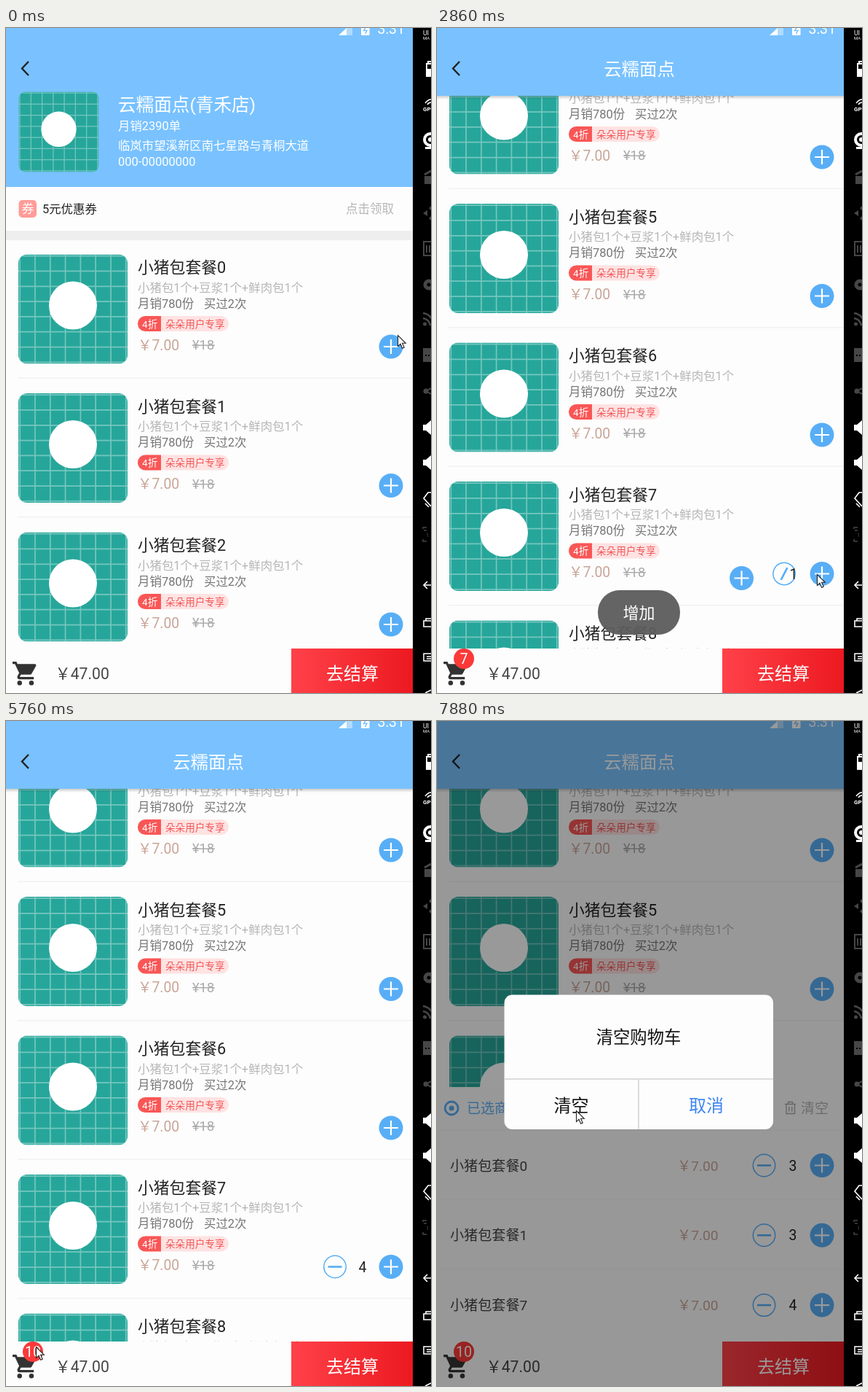
These frames come from a looping animation (584 by 912 pixels, 8000 ms). An HTML page:

```html
<!DOCTYPE html>
<html lang="zh-CN">
<head>
<meta charset="utf-8">
<title>点餐购物车</title>
<style>
  html, body { margin: 0; width: 100%; height: 100%; overflow: hidden; background: #000; }
  svg { display: block; width: 584px; height: 912px; }
  text { font-family: Roboto, "Noto Sans CJK SC", "Noto Sans CJK", sans-serif; white-space: pre; }
</style>
</head>
<body>
<svg id="stage" viewBox="0 0 584 912">
  <defs>
    <linearGradient id="red">
      <stop offset="0" stop-color="#ff4149"/><stop offset="1" stop-color="#ec1920"/>
    </linearGradient>
    <linearGradient id="fade" x2="0" y2="1">
      <stop offset="0" stop-opacity=".2"/><stop offset="1" stop-opacity="0"/>
    </linearGradient>
    <clipPath id="sheetClip"><rect width="559" height="851"/></clipPath>
    <clipPath id="tileClip"><rect width="150" height="150" rx="12"/></clipPath>
    <g id="plus">
      <circle r="16.5" fill="#58aef6"/>
      <path d="M-10 0H10M0-10V10" stroke="#fff" stroke-width="2.2"/>
    </g>
    <g id="minus">
      <circle r="15.2" fill="#fdfdfd" stroke="#58aef6" stroke-width="1.5"/>
      <path d="M-9.5 0H9.5" stroke="#58aef6" stroke-width="2.6"/>
    </g>
    <g id="tile" clip-path="url(#tileClip)">
      <rect width="150" height="150" fill="#26a69a"/>
      <path id="grid" stroke="#fff" stroke-opacity=".36" stroke-width="1.7"/>
      <circle cx="75" cy="70" r="33" fill="#fff"/>
    </g>
  </defs>

  <rect width="559" height="912" fill="#fdfdfd"/>
  <g id="list"></g>
  <g id="head"></g>
  <rect id="scrim" width="559" fill="#79c2ff"/>
  <rect width="559" height="27" fill="#79c2ff"/>
  <g id="bar"></g>
  <rect id="dim" width="559" height="851"/>
  <g clip-path="url(#sheetClip)"><g id="sheet"></g></g>
  <g id="foot"></g>
  <g id="flights"></g>
  <g id="badge">
    <circle cx="37" cy="865" r="14" fill="#fc3939"/>
    <text id="total" x="37" y="872" font-size="19.6" fill="#fff" text-anchor="middle"></text>
  </g>
  <g id="toast"></g>
  <g id="dialog"></g>
  <g id="side"></g>
  <g id="finder">
    <rect x="422" y="416" width="30" height="30" rx="4" fill="#fb474d"/>
    <circle cx="435" cy="429" r="6.5" fill="none" stroke="#fff" stroke-width="1.6"/>
    <path d="M440 434l6 6" stroke="#fff" stroke-width="2.4"/>
  </g>
  <path id="cursor" d="M.5.5V15.6L4 12.3 6.6 18.3 9.2 17.2 6.6 11.3H11.3Z" fill="#fff" stroke="#222" stroke-width="1.1"/>
</svg>

<script>
const LOOP = 8000, FLY = 500, ROLL = 163;
const STEP = 190.5, FIRST = 310.5, COLLAPSE = 198;
const $ = id => document.getElementById(id);
const fill = (id, html) => { $(id).innerHTML = html; };

// Text placed by the middle of its glyphs
const text = (x, mid, size, color, str, anchor = 'start', attrs = '') =>
  `<text x="${x}" y="${mid + size * .37}" font-size="${size}" fill="${color}" text-anchor="${anchor}" ${attrs}>${str}</text>`;
const rect = (x, y, w, h, color, attrs = '') =>
  `<rect x="${x}" y="${y}" width="${w}" height="${h}" fill="${color}" ${attrs}/>`;
const path = (d, color, width = 1.5) =>
  `<path d="${d}" fill="none" stroke="${color}" stroke-width="${width}"/>`;
const use = (id, x, y, attrs = '') => `<use href="#${id}" transform="translate(${x} ${y})" ${attrs}/>`;

let grid = '';
for (let k = 0; k < 8; k++) {
  const p = (2.1 + k * 20.83).toFixed(1);
  grid += `M${p} 0V150M0 ${p}H150`;
}
$('grid').setAttribute('d', grid);

const item = i => `<g id="item${i}">
  ${use('tile', 17, 0)}
  ${text(181, 17.5, 21.8, '#222', '小猪包套餐' + i)}
  ${text(181, 45, 16.45, '#b6b6b6', '小猪包1个+豆浆1个+鲜肉包1个')}
  ${text(181, 67.3, 16.5, '#757575', '月销780份')}
  ${text(272, 67.3, 16.4, '#757575', '买过2次')}
  ${rect(181, 84.5, 125, 21, '#ffe2e2', 'rx="10.5"')}
  <path d="M213 84.5H191.500a10.500 10.500 0 0 0 0 21H213Z" fill="#f95656"/>
  ${text(187, 95.2, 13.6, '#fff', '4折')}
  ${text(219, 95.2, 13.6, '#f25555', '朵朵用户专享')}
  ${text(181, 124, 19.4, '#c9a497', '￥7.00')}
  ${text(256, 124, 18.3, '#aaa', '¥18')}
  ${rect(256, 124, 31, 1.4, '#aaa')}
  ${rect(16, 169, 543, 1.5, '#f1f1f1')}
  <g id="pick${i}"><use id="minus${i}" href="#minus"/>${text(490, 127, 19.4, '#222', '', 'middle', `id="count${i}"`)}</g>
  ${use('plus', 529, 126.5)}
</g>`;
const ids = [...Array(9).keys()];
fill('list', ids.map(item).join(''));

fill('head',
  rect(0, 0, 559, 218, '#79c2ff') +
  use('tile', 17.5, 87.5).replace('")', '')
    .replace(')"', ') scale(.733)"') +
  text(154, 105, 24.6, '#fff', '云糯面点(青禾店)') +
  text(154, 134, 16.4, '#fff', '月销2390单') +
  text(154, 160.5, 16.4, '#fff', '临岚市望溪新区南七星路与青桐大道') +
  text(154, 183, 16.5, '#fff', '000-00000000') +
  rect(0, 218, 559, 60, '#fdfdfd') +
  rect(17.5, 236, 24.5, 24, '#ff9b98', 'rx="5"') +
  text(30, 248, 17, '#fff', '券', 'middle') +
  text(50, 248, 16.4, '#222', '5元优惠券') +
  text(467, 248, 16.5, '#b6b6b6', '点击领取') +
  rect(0, 278, 559, 13, '#eee'));

fill('bar',
  path('M31 46L22 55.500 31 65', '#222', 2.4) +
  `<g id="title">${text(278, 55.5, 24.4, '#fff', '云糯面点', 'middle')}${rect(0, 93, 559, 5, 'url(#fade)')}</g>` +
  '<path d="M457 10L468 0V10Z" fill="#fff"/><path d="M468 0H476V10H468Z" fill="#fff" opacity=".4"/>' +
  rect(488, -4, 11.5, 14, '#fff', 'rx="1"') +
  path('M494.500 -1L491.500 3.500H496L493.500 8', '#79c2ff', 1.5) +
  text(510.5, .8, 19.4, '#fff', '3:31'));

const cart = [0, 1, 7];
const row = (i, k) => {
  const y = 107.5 + k * 95.8;
  return rect(0, y - 49.5, 559, 1.5, '#f6f6f6') +
    text(18, y, 19.1, '#444', '小猪包套餐' + i) +
    text(330, y, 19.2, '#c9a497', '￥7.00') +
    use('minus', 449.5, y) + use('plus', 529, y) +
    text(489, y, 19.4, '#222', i === 7 ? 4 : 3, 'middle');
};
fill('sheet',
  rect(0, 0, 559, 420, '#fdfdfd') +
  '<circle cx="20" cy="29" r="9" fill="none" stroke="#58aef6" stroke-width="2.8"/><circle cx="20" cy="29" r="3.500" fill="#58aef6"/>' +
  text(41, 29, 19, '#58aef6', '已选商品') +
  path('M478 23.500H493M482.500 23V20.500H488.500V23M480 24V36.500H491.500V24M483.800 27V33.500M487.700 27V33.500', '#aaa', 1.4) +
  text(500, 29, 19, '#b2b2b2', '清空') +
  cart.map(row).join(''));

fill('foot',
  rect(0, 851, 559, 61, '#fdfdfd') +
  `<g transform="translate(7.400 865.800) scale(1.62)" fill="#333">
    <circle cx="7" cy="20" r="2"/><circle cx="17" cy="20" r="2"/>
    <path d="M1 2V4H3L6.600 11.600 5.250 14C4.500 15.500 5.500 17 7 17H19V15H7.400L7.200 14.600 8.100 13H15.550C16.300 13 17 12.600 17.300 12L20.900 5.500C21.200 4.700 20.700 4 20 4H5.200L4.270 2Z"/>
  </g>` +
  text(67.5, 885.5, 21.2, '#444', '￥47.00') +
  rect(392, 851, 167, 61, 'url(#red)') +
  text(476, 885.5, 24, '#fff', '去结算', 'middle'));

fill('toast',
  rect(221, 771, 113, 61, '#5c5c5c', 'rx="30" opacity=".95"') +
  text(277.5, 802, 22, '#fff', '增加', 'middle'));

fill('dialog',
  rect(0, 0, 559, 912, '#000', 'opacity=".4"') +
  rect(92.5, 375.5, 369.5, 184.5, '#fdfdfd', 'rx="11"') +
  rect(92.5, 490, 369.5, 2, '#dcdcdc') + rect(276, 491, 2, 69, '#dcdcdc') +
  text(277, 433, 23.3, '#111', '清空购物车', 'middle') +
  text(184.5, 527, 24, '#111', '清空', 'middle') +
  text(370, 527, 24, '#3f86f2', '取消', 'middle'));

const W = '#fff', G = '#464646';
fill('side',
  rect(559, 0, 25, 912, '#000') +
  text(573, 7, 9, W, 'Ul') + text(573, 14, 6, W, 'MA') +
  path('M584 49H578V66H584M580 48V46H584', W, 2) + rect(578, 56, 6, 10, W) +
  path('M576 103Q580 98 584 98M579 105Q581 102 584 102', W) + text(573, 111, 8, W, 'GP', 'start', 'font-weight="700"') +
  '<circle cx="583" cy="153" r="8" fill="none" stroke="#fff" stroke-width="4"/><circle cx="583" cy="153" r="3" fill="#fff"/>' + rect(576, 163, 8, 3, W) +
  rect(575, 203, 9, 11, G) + path('M575 201L584 196', G, 3) +
  `<path d="M573 254L579 250V258ZM581 247L584 244V250ZM581 261L584 264V258Z" fill="${G}"/>` +
  path('M584 293H574V312H584M578 298V308M582 298V308', G, 2) +
  `<circle cx="581" cy="352" r="5" fill="none" stroke="${G}" stroke-width="5"/>` +
  path('M573 391Q584 392 590 408M573 398Q581 399 583 408', G, 2.5) + `<circle cx="575.500" cy="406" r="2.500" fill="${G}"/>` +
  rect(573, 439, 11, 19, G) + rect(576, 448, 2, 2, '#000') + rect(580, 448, 2, 2, '#000') +
  `<circle cx="577" cy="498" r="3.500" fill="${G}"/>` + path('M577 498L584 494M577 498L584 502', G, 2) +
  [548, 596].map(y => `<path d="M573 ${y - 4}H577L584 ${y - 10}V${y + 10}L577 ${y + 4}H573Z" fill="#fff"/>`).join('') +
  path('M584 637L580 637 574 645 584 656M576 652L581 657', W, 1.6) +
  path('M573 687V685H578M573 701V704H578M574 689H578', G) + text(577, 695, 8, G, '1') +
  path('M579 759L574 764 579 769M574 764H584', W, 1.6) +
  path('M584 813H574V821H584M577 813V810H584', W, 1.6) +
  path('M584 858H574V868H584M578 862H584M578 865H584', W) +
  path('M584 908L576 912', W, 1.6));

// Tap times with the dish tapped and the height of its button
const taps = [
  [150, 0, 437], [330, 0, 437], [540, 0, 437],
  [860, 1, 627], [1080, 1, 627], [1329, 1, 627],
  [2750, 7, 748], [3060, 7, 748], [3380, 7, 748], [3700, 7, 748]
];
fill('flights', taps.map(() => '<use href="#plus"/>').join(''));
const flights = [...$('flights').children];

const scrollKeys = [[1400, 0], [1620, 189.5], [1720, 189.5], [1930, 470], [2190, 800], [2450, 985], [2620, 1022]];
const sheetKeys = [[4680, 851], [4900, 502], [5140, 502], [5361, 851], [6190, 851], [6560, 502]];
const dimKeys = [[4660, 0], [4800, .3], [5361, .3], [5560, 0], [5800, 0], [6300, .3]];
const toastKeys = [[170, 0], [230, 1], [2300, 1], [2400, 0], [2770, 0], [2840, 1], [4380, 1], [4500, 0]];
const dialogKeys = [[7380, 0], [7560, 1]];
const cursorKeys = [
  [560, 538, 421], [790, 530, 615], [1380, 530, 615], [1620, 437, 384], [1720, 437, 384],
  [1900, 470, 690], [2060, 480, 380], [2310, 570, 560], [2640, 522, 749], [4400, 522, 749],
  [4640, 41, 858], [4850, 41, 858], [5080, 295, 429], [5400, 295, 429], [5740, 41, 858],
  [6400, 41, 858], [6960, 501, 551], [7400, 501, 551], [7800, 191, 534]
];

const clamp = v => Math.max(0, Math.min(1, v));
function track(keys, t, col = 1) {
  const n = keys.findIndex(k => k[0] > t);
  if (n === 0) return keys[0][col];
  if (n < 0) return keys[keys.length - 1][col];
  const a = keys[n - 1], b = keys[n];
  return a[col] + (b[col] - a[col]) * (t - a[0]) / (b[0] - a[0]);
}

const runs = [
  [0, 0, 1], [160, 1080, 8], [1220, 1500, 3], [1650, 2190, 5], [2310, 2720, 4], [2860, 3280, 4],
  [3400, 4380, 8], [4520, 5050, 5], [5180, 5460, 3], [5610, 5760, 2], [5880, 5880, 1],
  [6190, 7150, 8], [7300, 7880, 5]
];
const ticks = runs.flatMap(([a, b, n]) =>
  Array.from({ length: n }, (_, k) => n > 1 ? a + (b - a) * k / (n - 1) : a));

const set = (el, name, value) => el.setAttribute(name, value);
const move = (el, x, y, more = '') => set(el, 'transform', `translate(${x} ${y}) ${more}`);
const show = (id, on) => set($(id), 'opacity', +on);

function draw(t) {
  const s = track(scrollKeys, t);
  move($('head'), 0, -s);
  set($('scrim'), 'height', Math.max(93, 291 - s));
  show('scrim', clamp(s / COLLAPSE));
  show('title', s >= COLLAPSE);

  const done = taps.filter(tap => tap[0] <= t);
  for (const i of ids) {
    move($('item' + i), 0, FIRST + STEP * i - s);
    const mine = done.filter(tap => tap[1] === i);
    show('pick' + i, mine.length > 0);
    if (!mine.length) continue;
    const p = clamp((t - mine[0][0]) / ROLL);
    move($('minus' + i), 529 - 77 * p, 126.5, `rotate(${360 * (1 - p)})`);
    $('count' + i).textContent = mine.length;
  }

  taps.forEach(([start, , y], n) => {
    const p = (t - start) / FLY;
    set(flights[n], 'opacity', +(p >= 0 && p < 1));
    move(flights[n], 529 - 502 * p, y + (882 - y) * p * p);
  });
  show('badge', done.length > 0);
  $('total').textContent = done.length;

  const ask = track(dialogKeys, t);
  show('dim', track(dimKeys, t) * (1 - ask));
  move($('sheet'), 0, track(sheetKeys, t));
  show('dialog', ask);
  show('toast', track(toastKeys, t));
  show('finder', t >= 1640 && t < 2050);
  move($('cursor'), track(cursorKeys, t), track(cursorKeys, t, 2));
}

let last = -1;
function frame(now) {
  const t = now % LOOP;
  const tick = ticks.filter(v => v <= t + .5).pop();
  if (tick !== last) draw(last = tick);
  requestAnimationFrame(frame);
}
draw(0);
requestAnimationFrame(frame);
</script>
</body>
</html>
```
